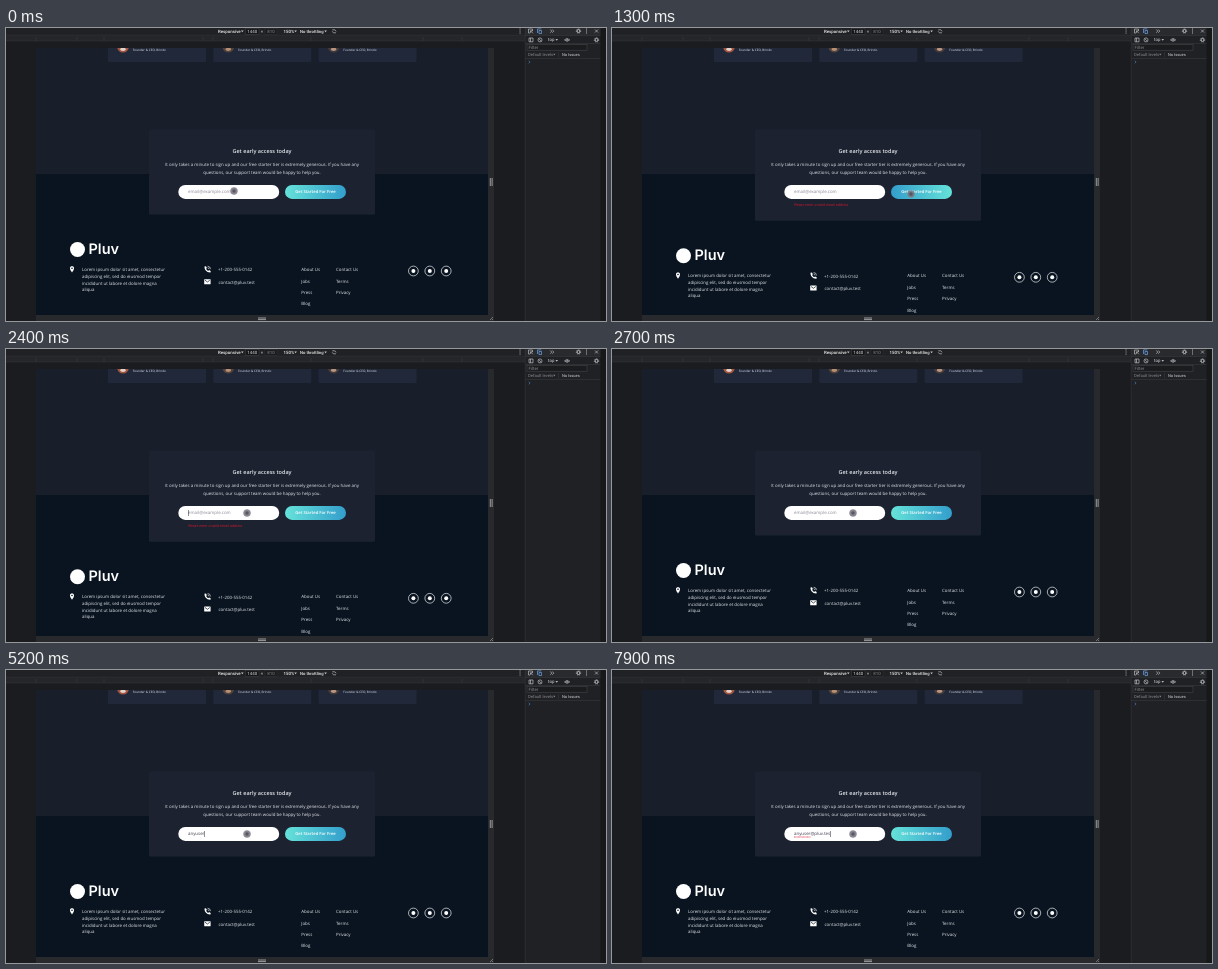
An HTML page that plays this animation: 600x293 px, repeating every 8 s.

```html
<!DOCTYPE html>
<html lang="en">
<head>
<meta charset="utf-8">
<title>Early access form</title>
<style>
  html, body { margin: 0; width: 100%; height: 100%; overflow: hidden; background: #1b1c1f; }
  svg { display: block; width: 600px; height: 293px; }
  text { font: 4.4px "Open Sans", sans-serif; fill: #e4e7ec; text-rendering: geometricPrecision; white-space: pre; }
  .ui text { font: 4.4px Roboto, sans-serif; fill: #d5d7da; }
  .ui .dim { fill: #85888d; }
  .ui .bold { font-weight: 500; fill: #eceded; }
  .mid { text-anchor: middle; }
  .line { fill: none; stroke: #b9bcc0; stroke-width: .7; }
  .role { font-size: 3.1px; }
  .title { font-size: 5.5px; font-weight: 600; }
  .cta { font-size: 4.2px; font-weight: 600; fill: #fff; }
  .brand { font: 600 14.5px Inter, sans-serif; fill: #fff; }
  .error { font-size: 3.65px; font-style: italic; fill: #d3192f; }
  .hint { fill: #8b8a99; }
  .typed { fill: #3d3b4c; }
</style>
</head>
<body>
<svg viewBox="0 0 600 293">
  <defs>
    <linearGradient id="rest"><stop stop-color="#65e2d9"/><stop offset="1" stop-color="#339ecc"/></linearGradient>
    <linearGradient id="hover"><stop stop-color="#339ecc"/><stop offset="1" stop-color="#65e2d9"/></linearGradient>
    <clipPath id="view"><rect x="30" y="20" width="452" height="267"/></clipPath>
  </defs>

  <!-- Device toolbar -->
  <g class="ui">
    <rect width="519" height="7" fill="#202124"/>
    <rect y="7" width="519" height="6" fill="#25262a"/>
    <path d="M0 7.2H519M0 13H519" stroke="#333439" stroke-width=".5"/>
    <path d="M30 9v4M71 9v4M98 9v4M197 9v4M207 9v4M305 9v4M417 9v4M456 9v4" stroke="#3a3b40" stroke-width=".6"/>
    <text x="212" y="4.8" class="bold">Responsive</text>
    <rect x="239.5" y=".4" width="13.5" height="5.8" fill="#151618" stroke="#4a4b4f" stroke-width=".4"/>
    <text x="246.2" y="4.8" class="mid">1440</text>
    <text x="255.8" y="4.8" class="mid">×</text>
    <rect x="259" y=".4" width="12" height="5.8" fill="#1a1b1d" stroke="#3a3b3f" stroke-width=".4"/>
    <text x="265" y="4.8" class="mid dim">810</text>
    <text x="277.5" y="4.8" class="bold">150%</text>
    <text x="294" y="4.8" class="bold" style="font-size:4.2px">No throttling</text>
    <path d="M235 2.4h2.6l-1.3 1.9zM288.3 2.4h2.6l-1.3 1.9zM318.3 2.4h2.6l-1.3 1.9z" fill="#c5c7ca"/>
    <path class="line" d="M326.3 1.8h2.6l1.2 1.6M330 4.8h-2.6l-1.2-1.5"/>
    <path d="M514 .9h.1M514 3h.1M514 5.1h.1" stroke="#b9bcc0" stroke-linecap="round"/>
  </g>

  <!-- Resize handles -->
  <rect x="482" y="20" width="6" height="273" fill="#28292c"/>
  <rect x="30" y="287" width="458" height="6" fill="#28292c"/>
  <path d="M484.3 150v8M486.1 150v8M252 290h8M252 291.6h8" stroke="#a5a7aa" stroke-width=".9"/>
  <path d="M484 292l3-3M486 292l1-1" stroke="#a5a7aa" stroke-width=".6"/>

  <!-- Page -->
  <g clip-path="url(#view)">
    <rect x="30" y="20" width="452" height="126" fill="#181e2a"/>
    <rect x="30" y="146" width="452" height="141" fill="#091420"/>
    <g id="quotes"></g>
    <rect id="card" x="143" y="101.5" width="226" height="85" rx="1.5" fill="#1c2230"/>
    <text class="mid title" x="256" y="125.2">Get early access today</text>
    <text class="mid" x="256" y="137.6">It only takes a minute to sign up and our free starter tier is extremely generous. If you have any</text>
    <text class="mid" x="256" y="145.5">questions, our support team would be happy to help you.</text>
    <rect x="172.3" y="157" width="100.9" height="13.9" rx="6.95" fill="#fff"/>
    <text id="hint" class="hint" x="182" y="165.4">email@example.com</text>
    <text id="typed" class="typed" x="182" y="165.4"></text>
    <path id="squiggle" d="M182 167H198.5" stroke="#e0384e" stroke-width=".8" stroke-dasharray="1 .3"/>
    <rect id="caret" y="161" width=".5" height="6" fill="#222"/>
    <rect id="button" x="279" y="157" width="61" height="13.9" rx="6.95" fill="url(#rest)"/>
    <text class="mid cta" x="309.5" y="165.4">Get Started For Free</text>
    <text id="error" class="error" x="182" y="178.4">Please enter a valid email address</text>

    <g id="footer">
      <circle cx="71.5" cy="221.5" r="7.5" fill="#fff"/>
      <text class="brand" x="82.5" y="226.2">Pluv</text>
      <path d="M66 244.4c-3-3.7-2.4-6.2 0-6.2s3 2.500 0 6.200z" fill="#fff"/>
      <circle cx="66" cy="240.200" r=".8" fill="#091420"/>
      <g id="about"></g>
      <path d="M198.500 238.500l1.500-.3.900 1.800-.8.800q.700 1.500 2.100 2.100l.8-.8 1.700.8-.2 1.500c-4 .2-6.200-2.900-6-5.900z" fill="#fff"/>
      <path d="M201.600 238.200q2.700.1 2.900 2.900M201.600 239.700q1.200.1 1.400 1.400" fill="none" stroke="#fff" stroke-width=".6"/>
      <text x="212" y="243.300">+1-200-555-0142</text>
      <rect x="198.200" y="251.200" width="6.400" height="5" rx=".5" fill="#fff"/>
      <path d="M199 252.200l2.400 1.800 2.400-1.800" fill="none" stroke="#091420" stroke-width=".7"/>
      <text x="212.500" y="255.700">contact@pluv.test</text>
      <g id="links"></g>
      <g id="social"></g>
    </g>

    <g id="touch">
      <circle r="3.500" fill="#74717c" fill-opacity=".85" stroke="#8d8a94" stroke-width=".5"/>
      <circle r="1.700" fill="#4f4c57" fill-opacity=".8"/>
    </g>
  </g>

  <!-- Console panel -->
  <g class="ui">
    <rect x="519" width="75.500" height="293" fill="#202124"/>
    <rect x="594.500" width="5.500" height="293" fill="#17181a"/>
    <rect x="519" width="75.500" height="7.500" fill="#292a2d"/>
    <path d="M519.200 0V293M519 7.500h75.500M519 15.500h75.500M519 30.500h75.500" stroke="#3b3c40" stroke-width=".5"/>
    <path class="line" d="M526.500 3V1h-4v4h1.500M524.500 2.800l2.300 2.400M524.500 4.800v-2h2"/>
    <path class="line" style="stroke:#6ea5ee" d="M531.500 5V.9h3.800M533 2.500h2.500v3H533z"/>
    <path class="line" d="M544.300 1.500l1.500 1.600-1.500 1.600M546.300 1.500l1.500 1.600-1.500 1.600"/>
    <g id="gears"></g>
    <path d="M580.500 1h.1M580.500 3h.1M580.500 5h.1" stroke="#c5c7ca" stroke-linecap="round"/>
    <path class="line" d="M589 1.500l3 3M592 1.500l-3 3"/>
    <path class="line" d="M523 10h4v3.800h-4zM524.500 10v3.800"/>
    <circle class="line" cx="534" cy="11.900" r="2"/>
    <path class="line" d="M532.600 10.500l2.800 2.800"/>
    <text x="542" y="13.400">top</text>
    <path d="M549.500 11h2.500l-1.250 1.800z" fill="#b9bcc0"/>
    <path class="line" d="M558.500 11.900q2.600-3 5.200 0q-2.600 3-5.200 0z"/>
    <circle cx="561.100" cy="11.900" r=".8" fill="#b9bcc0"/>
    <rect x="521" y="16.400" width="60" height="5.800" fill="#1b1c1e" stroke="#4a4b50" stroke-width=".5"/>
    <text class="dim" x="522.500" y="20.900">Filter</text>
    <text class="dim" x="522" y="28.200" style="font-size:4.200px">Default levels</text>
    <path d="M547.200 25.800h2.200l-1.100 1.600z" fill="#85888d"/>
    <path d="M552.500 24v5.500" stroke="#3b3c40" stroke-width=".5"/>
    <text x="556" y="28.200" style="font-size:4px">No Issues</text>
    <path class="line" style="stroke:#4e7fc0" d="M522.800 32.700l1.300 1.300-1.300 1.300"/>
  </g>
</svg>
<script>
const LOOP = 8000, TICK = 100, SHIFT = 6.3, TEXT_X = 182;
const $ = id => document.getElementById(id);
const label = (x, y, s, cls = '') => `<text class="${cls}" x="${x}" y="${y}">${s}</text>`;

// Repeated parts
$('quotes').innerHTML = [[102, '#a4553f', '#ded3cd'], [207.3, '#51433d', '#b88f72'], [312.6, '#433b3b', '#b99480']]
  .map(([x, back, tone]) => `
    <rect x="${x}" y="10" width="98" height="24" rx="1.5" fill="#20283a"/>
    <circle cx="${x + 15}" cy="18.8" r="5.8" fill="${back}"/>
    <ellipse cx="${x + 15}" cy="21.300" rx="2.700" ry="1.600" fill="${tone}"/>
    ${label(x + 24.700, 22.700, 'Founder &amp; CEO, Brindo', 'role')}`).join('');

$('about').innerHTML = ['Lorem ipsum dolor sit amet, consectetur', 'adipiscing elit, sed do eiusmod tempor',
  'incididunt ut labore et dolore magna', 'aliqua'].map((s, i) => label(76, 243.200 + i * 6.650, s)).join('');

$('links').innerHTML = [[295.300, 'About Us', 'Jobs', 'Press', 'Blog'], [330, 'Contact Us', 'Terms', 'Privacy']]
  .map(([x, ...rows]) => rows.map((s, i) => label(x, 243.200 + i * 11.400, s)).join('')).join('');

$('social').innerHTML = [407.400, 423.800, 440.200].map(x => `
  <circle cx="${x}" cy="243" r="4.900" fill="none" stroke="#e8ebef" stroke-width=".7"/>
  <circle cx="${x}" cy="243" r="2" fill="#fff"/>`).join('');

$('gears').innerHTML = [[572.500, 3], [590.500, 11.900]].map(([x, y]) => `
  <circle cx="${x}" cy="${y}" r="1.500" class="line" style="stroke-width:1"/>
  <circle cx="${x}" cy="${y}" r="2.200" class="line" stroke-dasharray=".9 .83"/>`).join('');

// Timeline
const entry = 'anyuser@pluv.tes';
const keyTimes = [3600, 3800, 4000, 4300, 4400, 4600, 4800, 6000, 6500, 6700, 7000, 7300, 7400, 7500, 7700, 7900];
const path = [[0, 228, 163], [100, 228, 163], [900, 299, 166], [1300, 299, 166], [1800, 241, 164], [LOOP, 241, 164]];
const within = (t, from, to) => t >= from && t < to;
const show = (id, on) => $(id).setAttribute('visibility', on ? 'visible' : 'hidden');

function touchAt(t) {
  const i = path.findIndex(p => p[0] > t);
  const [t0, x0, y0] = path[i - 1], [t1, x1, y1] = path[i];
  const k = (t - t0) / (t1 - t0), e = k * k * (3 - 2 * k);
  return [x0 + (x1 - x0) * e, y0 + (y1 - y0) * e];
}

function draw(t) {
  const failed = within(t, 1300, 2700);
  show('error', failed);
  $('card').setAttribute('height', 85 + (failed ? SHIFT : 0));
  $('footer').setAttribute('transform', `translate(0 ${failed ? SHIFT : 0})`);
  $('button').setAttribute('fill', `url(#${within(t, 1300, 2200) ? 'hover' : 'rest'})`);

  const count = keyTimes.filter(k => k <= t).length;
  const typed = $('typed');
  typed.textContent = entry.slice(0, count);
  show('hint', !count);
  show('squiggle', t >= 5900);

  // The caret blinks from the last tap or key press
  const since = t - (count ? keyTimes[count - 1] : 2100);
  show('caret', since >= 0 && since % 1000 < 500);
  $('caret').setAttribute('x', TEXT_X + (count ? typed.getComputedTextLength() : 0));

  const [x, y] = touchAt(t);
  const size = within(t, 1100, 1300) || within(t, 2100, 2300) ? .88 : 1;
  $('touch').setAttribute('transform', `translate(${x} ${y}) scale(${size})`);
}

const start = performance.now();
function tick() {
  const t = (performance.now() - start) % LOOP;
  draw(Math.floor(t / TICK) * TICK);
  requestAnimationFrame(tick);
}
tick();
</script>
</body>
</html>
```
